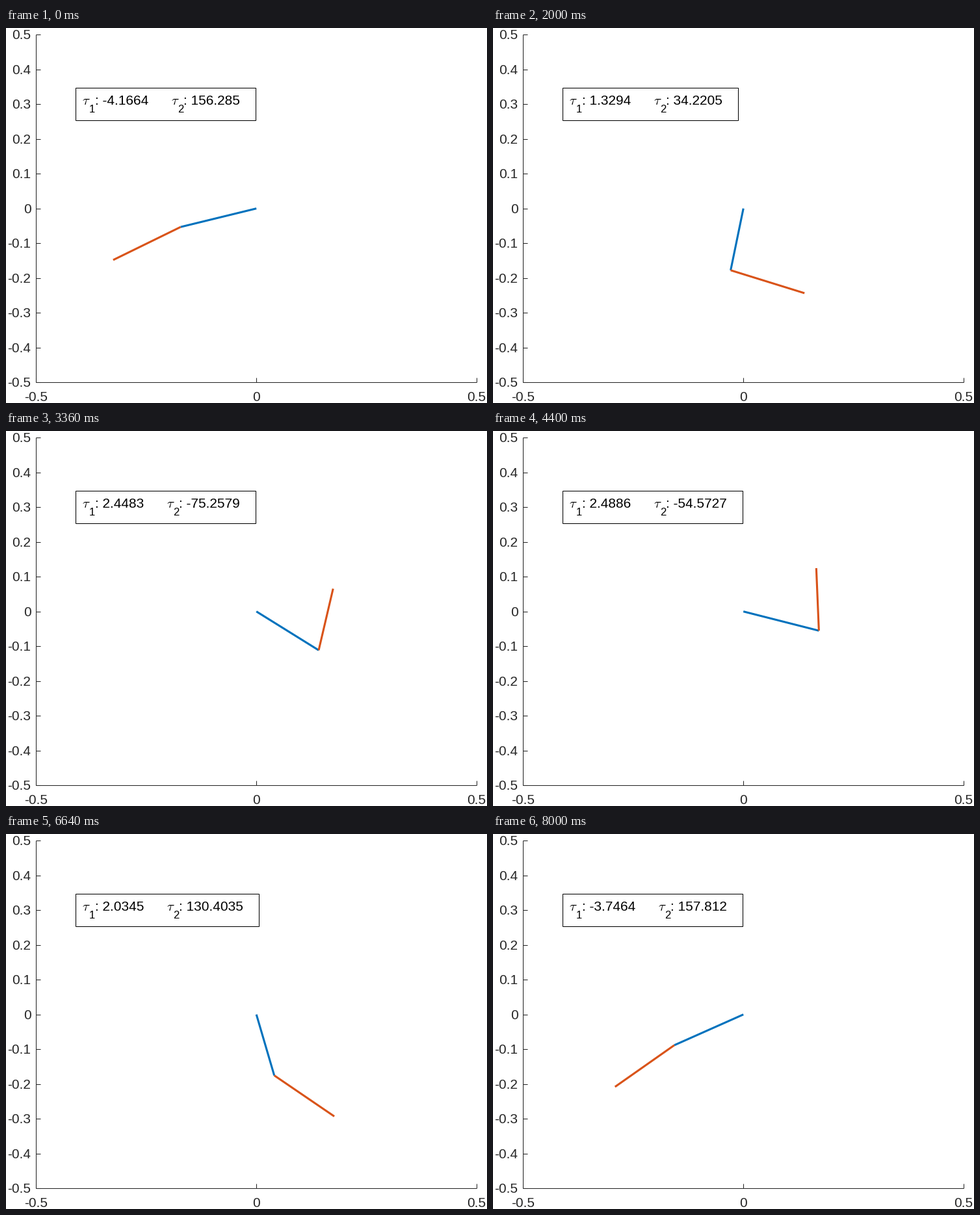
Animation of 740x577 px, one loop 8080 ms. Source, as a matplotlib script:

```python
import math
import numpy as np
import matplotlib
import matplotlib.pyplot as plt
from matplotlib.animation import FuncAnimation
from matplotlib.patches import Rectangle

matplotlib.rcParams["font.family"] = "Liberation Sans"
matplotlib.rcParams["mathtext.fontset"] = "cm"

W, H, DPI = 740, 577, 100
FRAMES, STEP = 101, 80
PX = 72 / DPI                      # points per pixel
EM = 10 * 150 / 72                 # 10 pt text at 150 dpi
GRAY, BLUE, ORANGE = "#262626", "#0072BD", "#D95319"

LEFT, RIGHT, TOP, BOTTOM = 46.2, 724.2, 10.2, 545.2
SX, SY = RIGHT - LEFT, BOTTOM - TOP
OX, OY = (LEFT + RIGHT) / 2, (TOP + BOTTOM) / 2
LINK = 0.18
PERIOD = 106                       # frames per swing of the arm


def swing(n, mean, *waves):
    """Joint angle in radians: a mean plus successive harmonics."""
    w = 2j * math.pi * n / PERIOD
    return math.radians(mean + sum((c * np.exp(k * w)).real
                                   for k, c in enumerate(waves, 1)))


def shoulder(n):
    return swing(n, 276.2, -69.9 + 14.8j, -6.3 - 0.5j, -2.2 - 1.1j, -0.6 + 0.8j)


def elbow(n):
    return swing(n, 63.9, -49.4 - 19j, 1.7j, -0.2 - 1.2j, 0.3 + 1.3j)


def torques(q1, q2):
    """Gravity load on each joint."""
    return (2.68 * math.cos(q1) + 1.89 * math.cos(q1 + q2),
            161.5 * math.cos(q2))


def num_text(v):
    digits = max(math.floor(math.log10(abs(v) or 1)) + 5, 5)
    return f"{v:.{digits}g}"


def advance(s):
    return EM * sum({"-": 0.333, ".": 0.278, ":": 0.278, " ": 0.278}.get(c, 0.556)
                    for c in s)


fig = plt.figure(figsize=(W / DPI, H / DPI), dpi=DPI, facecolor="white")
ax = fig.add_axes([0, 0, 1, 1])
ax.set_xlim(0, W)
ax.set_ylim(H, 0)
ax.axis("off")


def stroke(xs, ys, color=GRAY, width=1.04):
    return ax.plot(xs, ys, color=color, lw=width * PX, solid_capstyle="butt",
                   solid_joinstyle="miter")[0]


def label(x, base, s, color="black", size=EM):
    return ax.text(x, base, s, color=color, fontsize=size * PX,
                   ha="left", va="baseline")


stroke([LEFT, LEFT], [TOP, BOTTOM])
stroke([LEFT, RIGHT], [BOTTOM, BOTTOM])
for i in range(11):
    y = TOP + i * SY / 10
    s = f"{(5 - i) / 10:g}"
    stroke([LEFT, LEFT + 7], [y, y])
    label(38.3 - advance(s), y + 7.2, s, GRAY)
for i in range(3):
    x = LEFT + i * SX / 2
    s = f"{(i - 1) / 2:g}"
    stroke([x, x], [BOTTOM, BOTTOM - 7])
    label(x - 0.4 - advance(s) / 2, 573.6, s, GRAY)

BOX_X, BASE = 107.2, 118.4
frame_box = Rectangle((BOX_X, 92.2), 280, 50, fc="white", ec="black", lw=1.04 * PX)
ax.add_patch(frame_box)


class Readout:
    """A tau symbol with subscript, followed by its value."""

    def __init__(self, index):
        self.tau = label(0, BASE, r"$\tau$")
        self.sub = label(0, BASE + 11.2, str(index), size=0.8 * EM)
        self.value = label(0, BASE, "")

    def place(self, x, v):
        s = ": " + num_text(v)
        self.tau.set_x(x)
        self.sub.set_x(x + 10)
        self.value.set_x(x + 19.5)
        self.value.set_text(s)
        return x + 19.5 + advance(s)


first, second = Readout(1), Readout(2)
upper = stroke([], [], BLUE, 3.1)
lower = stroke([], [], ORANGE, 3.1)


def reach(x, y, angle):
    return x + LINK * SX * math.cos(angle), y - LINK * SY * math.sin(angle)


def draw(n):
    q1, q2 = shoulder(n), elbow(n)
    ex, ey = reach(OX, OY, q1)
    tx, ty = reach(ex, ey, q1 + q2)
    upper.set_data([OX, ex], [OY, ey])
    lower.set_data([ex, tx], [ey, ty])
    tau1, tau2 = torques(q1, q2)
    end = first.place(117.4, tau1)
    end = second.place(end + advance(" " * 6), tau2)
    frame_box.set_width(end + 24.1 - BOX_X)
    return upper, lower, frame_box


anim = FuncAnimation(fig, draw, frames=FRAMES, interval=STEP, repeat=True,
                     repeat_delay=0, blit=False)
plt.show()
```
